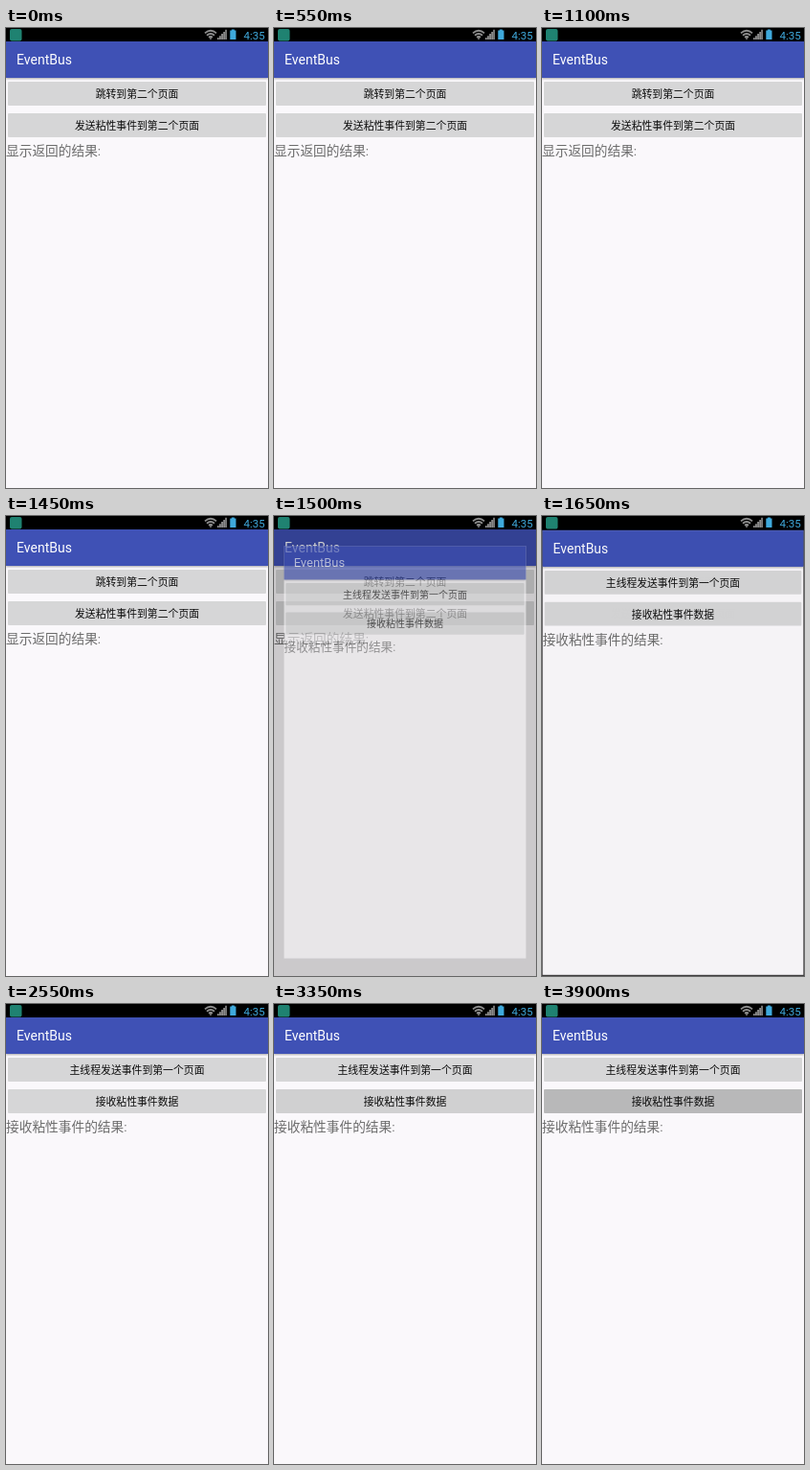
An HTML page that plays this animation: 274x480 px, repeating every 4000 ms.

```html
<!DOCTYPE html>
<html lang="zh-CN">
<head>
<meta charset="utf-8">
<title>EventBus</title>
<style>
  html, body { margin: 0; width: 100%; height: 100%; overflow: hidden; background: #000; }
  #stage {
    position: relative; width: 274px; height: 480px; overflow: hidden; background: #000;
    font-family: Roboto, "Noto Sans CJK SC", "Noto Sans CJK", sans-serif;
  }
  #stage div { position: absolute; white-space: nowrap; }
  #status { left: 0; top: 0; width: 274px; height: 14px; }
  #status svg { position: absolute; left: 0; top: 0; }
  #clock { left: 248.5px; top: 0; line-height: 17px; font-size: 11.6px; color: #3fa9dc; }

  #stage .page {
    left: 0; top: 14px; width: 274px; height: 466px;
    background: #faf8fb; transform-origin: 137px 226px;
  }
  .bar {
    left: 0; top: 0; width: 263px; height: 38px; padding-left: 11px;
    background: #3f51b5; color: #fff; font-size: 14px; line-height: 39px;
    box-shadow: 0 1px 2px rgba(0, 0, 0, .32);
  }
  .button {
    left: 2px; width: 270px; height: 25px; border-radius: 1px;
    background: #d6d6d7; color: #0c0c0c;
    text-align: center; font-size: 10.85px; line-height: 28px;
  }
  .upper { top: 42px; }
  .lower { top: 75px; }
  .result { left: 0; top: 104px; line-height: 20px; font-size: 13.7px; color: #6c6c6c; }
</style>
</head>
<body>
<div id="stage">
  <div class="page" id="first">
    <div class="bar">EventBus</div>
    <div class="button upper">跳转到第二个页面</div>
    <div class="button lower">发送粘性事件到第二个页面</div>
    <div class="result">显示返回的结果:</div>
  </div>
  <div class="page" id="second">
    <div class="bar">EventBus</div>
    <div class="button upper">主线程发送事件到第一个页面</div>
    <div class="button lower" id="receive">接收粘性事件数据</div>
    <div class="result">接收粘性事件的结果:</div>
  </div>
  <div id="status">
    <svg width="274" height="14">
      <rect x="4" y="1" width="12.5" height="12.5" rx="2" fill="#1f8271"/>
      <g fill="none" stroke="#8f8f8f" stroke-width="1.8">
        <path d="M208 5.4Q214 .2 220 5.4"/>
        <path d="M210 7.7Q214 4.2 218 7.7"/>
        <path d="M212 9.8Q214 8.2 216 9.8"/>
      </g>
      <path d="M212.6 10.3h2.8L214 12.4z" fill="#8f8f8f"/>
      <path d="M221 12V10.2h1.7V12zM223.1 12V8.2h1.7V12zM225.2 12V6.1h1.7V12zM227.3 12V4h1.6V12zM229.3 12V1.8h1.5V12z" fill="#9a9a9a"/>
      <path d="M234.3 2.6h1.6V1.4h3v1.2h1.6V12h-6.2z" fill="#3fa9dc"/>
    </svg>
    <div id="clock">4:35</div>
  </div>
</div>
<script>
  const LOOP = 4000, TICK = 50;
  const [first, second, receive] =
    ["first", "second", "receive"].map(id => document.getElementById(id));

  const progress = (time, start, length) =>
    Math.min(1, Math.max(0, (time - start) / length));
  const easeOutQuint = p => 1 - (1 - p) ** 5;
  const mix = (a, b, p) => Math.round(a + (b - a) * p);

  function draw(time) {
    // The second page zooms in while the first one fades to black.
    const opened = time >= 1500;
    const enter = easeOutQuint(progress(time, 1425, 430));
    second.style.visibility = opened ? "visible" : "hidden";
    second.style.opacity = enter;
    second.style.transform = `scale(${0.8 + 0.2 * enter})`;
    first.style.opacity = opened ? 1 - progress(time, 1450, 267) : 1;

    const press = progress(time, 3300, 250);
    const [r, g, b] = [214, 214, 215].map(c => mix(c, c - 30, press));
    receive.style.background = `rgb(${r}, ${g}, ${b})`;
  }

  function loop() {
    const time = performance.now() % LOOP;
    draw(Math.floor(time / TICK) * TICK);
    requestAnimationFrame(loop);
  }
  loop();
</script>
</body>
</html>
```
